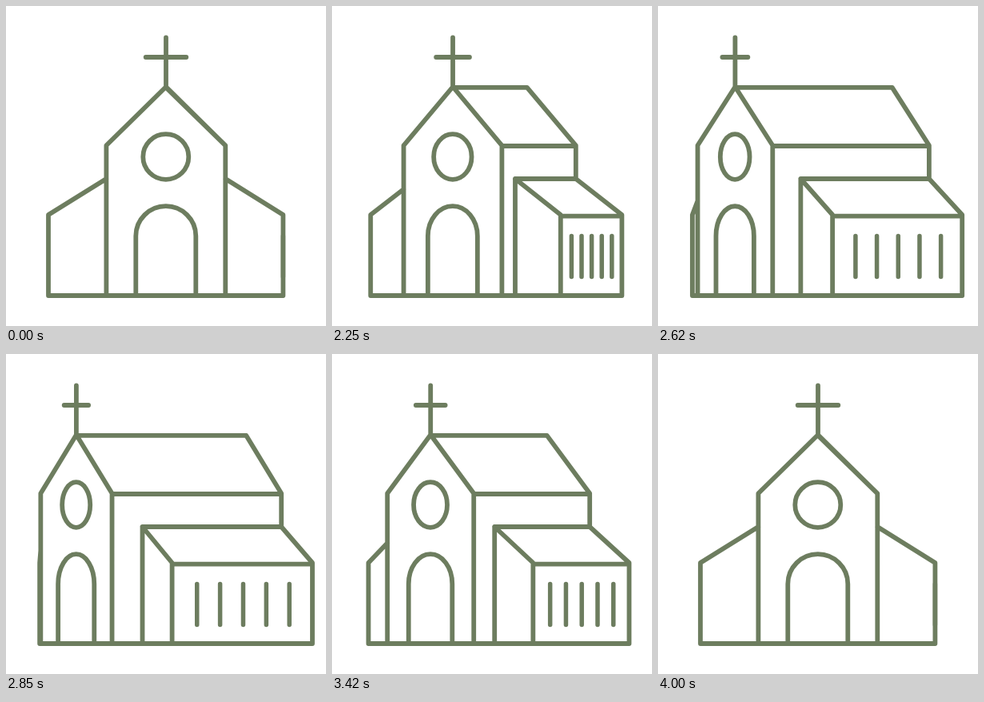
These frames come from a looping animation (400 px wide and 400 px high, 4.02 s). An HTML page:

```html
<!DOCTYPE html>
<html lang="en">
<head>
<meta charset="utf-8">
<title>Turning church</title>
<style>
  html, body { margin: 0; width: 100%; height: 100%; overflow: hidden; background: #fff; }
  svg { display: block; width: 100%; height: 100%; }
  path { fill: none; stroke: #6d7d5f; stroke-width: 5.8; stroke-linecap: round; stroke-linejoin: round; }
  #panes { stroke-width: 5.5; }
</style>
</head>
<body>
<svg viewBox="0 0 400 400">
  <path id="walls"/>
  <path id="panes"/>
</svg>
<script>
const LOOP = 4020, STEP = 25, BASE = 362;
const walls = document.getElementById('walls');
const panes = document.getElementById('panes');

// Cubic bezier easing with control points (a, 0) and (b, 1)
function ease(t, a, b) {
  if (t <= 0) return 0;
  if (t >= 1) return 1;
  let lo = 0, hi = 1;
  for (let i = 0; i < 30; i++) {
    const s = (lo + hi) / 2, r = 1 - s;
    const x = 3 * r * r * s * a + 3 * r * s * s * b + s * s * s;
    if (x < t) lo = s; else hi = s;
  }
  return lo * lo * (3 - 2 * lo);
}

// 0 = facing front, 1 = fully turned
function turnAt(ms) {
  return ms < 3000
    ? ease((ms - 2000) / 1000, 0.26, 0.15)
    : 1 - ease((ms - 3000) / 1000, 0.6, 0.4);
}

const line = (...pts) => 'M' + pts.map(p => p[0].toFixed(2) + ' ' + p[1].toFixed(2)).join('L');

function draw(q) {
  const at = (from, shift) => from + shift * q;
  const apex = at(200, -113.4), ridge = at(200, 101.5);
  const left = at(125.4, -83), right = at(274.3, -143.4), far = at(274.3, 70.7);
  const wing = at(53, -11), joint = at(216, 30);
  const lean = at(274.3, -105), corner = at(346.4, -140.4), outer = at(346.4, 37);
  const arm = at(25.3, -10.2), rx = at(28.5, -11.1), door = at(37.5, -15.1);
  const top = 101, wallTop = 174.3, wingTop = 261;
  const ridgeY = 101.9, eave = 175, roof = 216, low = 262.7;
  const mid = apex - 0.2;

  walls.setAttribute('d', [
    line([apex, 39.3], [apex, top]),
    line([apex - arm, 64], [apex + arm, 64]),
    line([left, BASE], [left, wallTop], [apex, top], [right, wallTop], [right, BASE]),
    line([apex, ridgeY], [ridge, ridgeY], [far, wallTop], [far, roof]),
    line([right, eave], [far, eave]),
    line([left, joint], [wing, wingTop], [wing, BASE], [outer, BASE], [outer, wingTop],
         [far, roof], [lean, roof], [lean, BASE]),
    line([lean, roof], [corner, wingTop], [corner, BASE]),
    line([corner, low], [outer, low]),
    `M${mid - door} ${BASE}V287.5A${door} 37.3 0 0 1 ${mid + door} 287.5V${BASE}`,
    `M${mid - rx} 188.5a${rx} 28.3 0 1 1 ${2 * rx} 0a${rx} 28.3 0 1 1 ${-2 * rx} 0Z`
  ].join(''));

  let d = '';
  for (let i = 0; i < 5; i++) {
    const x = at(346.4, -108.9 + 29.2 * i);
    d += line([x, 287.5], [x, 338.5]);
  }
  panes.setAttribute('d', d);
}

// The pose advances in even steps, each shown up to 5 ms early
function tick() {
  const ms = performance.now() % LOOP;
  draw(turnAt(Math.floor((ms + 5) / STEP) * STEP));
  requestAnimationFrame(tick);
}
tick();
</script>
</body>
</html>
```
